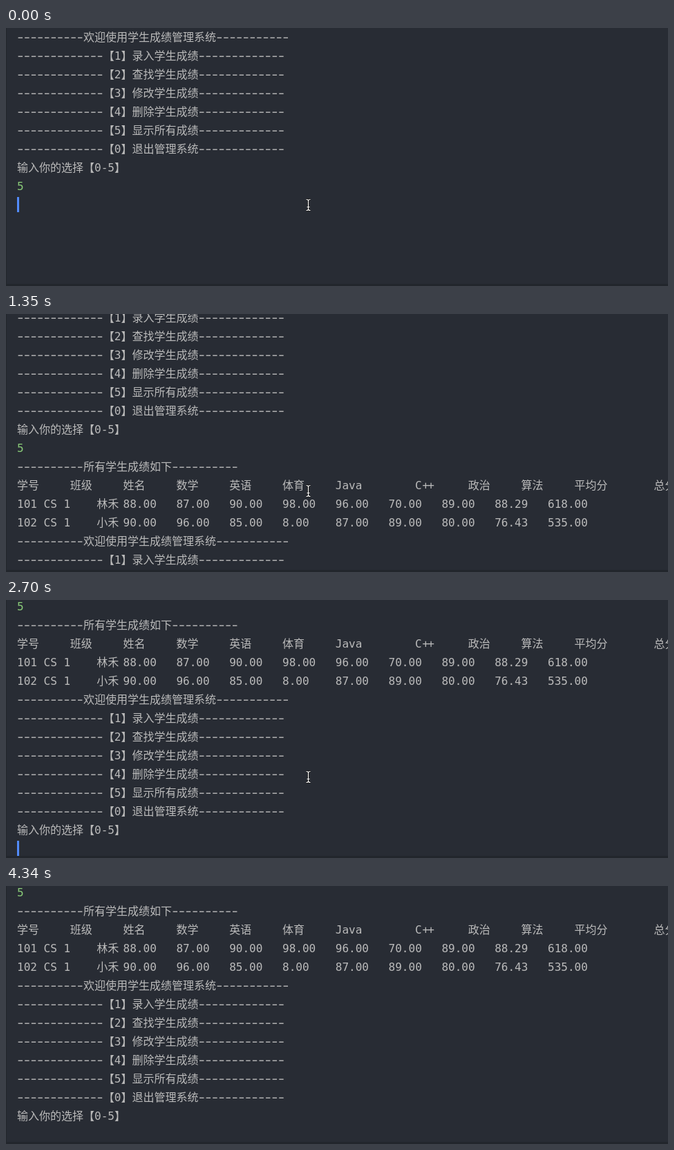
These frames come from a looping animation (958x374 px, 4770 ms). An HTML page with a canvas:

```html
<!DOCTYPE html>
<html lang="zh-CN">
<head>
<meta charset="utf-8">
<title>学生成绩管理系统</title>
<style>
  html, body { margin: 0; width: 100%; height: 100%; overflow: hidden; background: #282c34; }
  canvas { display: block; }
</style>
</head>
<body>
<canvas id="stage" width="958" height="374"></canvas>
<script>
const ctx = document.getElementById('stage').getContext('2d');
const WIDTH = 958, HEIGHT = 374, LOOP = 4770;
const LEFT = 16, CELL = 9.6, LINE = 27;
const GREY = '#bbbbbb', GREEN = '#89ca78', BLUE = '#528bff', EDGE = '#22262c';

const menu = [
  { title: '欢迎使用学生成绩管理系统', before: 10, after: 11 },
  ...['【1】录入学生成绩', '【2】查找学生成绩', '【3】修改学生成绩',
      '【4】删除学生成绩', '【5】显示所有成绩', '【0】退出管理系统']
    .map(title => ({ title, before: 13, after: 13 })),
  { cells: [[0, '输入你的选择【0-5】']] },
];

const header = {
  cells: [[0, '学号'], [8, '班级'], [16, '姓名'], [24, '数学'], [32, '英语'], [40, '体育'],
          [48, 'Java'], [60, 'C'], [61.1, '+'], [61.9, '+'],
          [68, '政治'], [76, '算法'], [84, '平均分'], [96, '总分']],
};

function student(id, name, scores) {
  const marks = scores.split(' ').map((score, i) => [16 + 8 * i, score]);
  return { cells: [[0, id + ' CS 1'], [12, name], ...marks] };
}

const prompt = [...menu, { cells: [[0, '5']], color: GREEN }];
const reply = [
  { title: '所有学生成绩如下', before: 10, after: 10 },
  header,
  student(101, '林禾', '88.00 87.00 90.00 98.00 96.00 70.00 89.00 88.29 618.00'),
  student(102, '小禾', '90.00 96.00 85.00 8.00 87.00 89.00 80.00 76.43 535.00'),
  ...menu,
];

// Step tracks: [start time, value]
const output = [[0, prompt], [1350, [...prompt, ...reply]]];
const scroll = [[0, 0], [1350, 35], [1500, 220]];
const caret = [[0, 256], [750, null], [1200, 256], [1350, null], [1500, 360], [2250, null],
               [2700, 360], [3300, null], [3740, 360], [4340, null]];
const pointer = [[0, [437.5, 256.5]], [2850, [496.5, 200.5]], [3000, [597.5, 217.5]],
                 [3150, [795.5, 314.5]], [3300, [833.5, 358.5]], [3450, null]];

const valueAt = (track, time) => track.findLast(([start]) => start <= time)[1];

function drawRule(x, y, count) {
  ctx.fillStyle = GREY;
  for (let i = 0; i < count; i++) ctx.fillRect(x + i * CELL + 1.6, y + 0.5, 6.4, 1.4);
}

function drawLine(line, y) {
  const baseline = y + 6;
  ctx.fillStyle = line.color || GREY;
  if (line.cells) {
    for (const [column, text] of line.cells) ctx.fillText(text, LEFT + column * CELL, baseline);
    return;
  }
  const x = LEFT + line.before * CELL;
  ctx.fillText(line.title, x, baseline);
  drawRule(LEFT, y, line.before);
  drawRule(x + ctx.measureText(line.title).width, y, line.after);
}

function drawPointer([x, y]) {
  const beam = new Path2D('M-3-8Q0-8 0-6Q0-8 3-8M0-6V6M-3 8Q0 8 0 6Q0 8 3 8M-2 3H2');
  ctx.save();
  ctx.translate(x, y);
  for (const [color, width] of [['#111', 2.8], ['#fff', 1.2]]) {
    ctx.strokeStyle = color;
    ctx.lineWidth = width;
    ctx.stroke(beam);
  }
  ctx.restore();
}

function draw(time) {
  ctx.fillStyle = '#282c34';
  ctx.fillRect(0, 0, WIDTH, HEIGHT);

  ctx.font = '500 16px "DejaVu Sans Mono", "Noto Sans CJK SC", "Noto Sans CJK", monospace';
  const offset = valueAt(scroll, time);
  valueAt(output, time).forEach((line, i) => drawLine(line, 13 + i * LINE - offset));

  ctx.fillStyle = EDGE;
  ctx.fillRect(0, 371, WIDTH, 3);
  ctx.fillRect(0, 0, 1, HEIGHT);

  const caretY = valueAt(caret, time);
  if (caretY !== null) {
    ctx.fillStyle = BLUE;
    ctx.fillRect(LEFT, caretY - 11, 3, 22);
  }
  const position = valueAt(pointer, time);
  if (position) drawPointer(position);
}

const begin = performance.now();
function tick() {
  draw((performance.now() - begin) % LOOP);
  requestAnimationFrame(tick);
}
tick();
</script>
</body>
</html>
```
